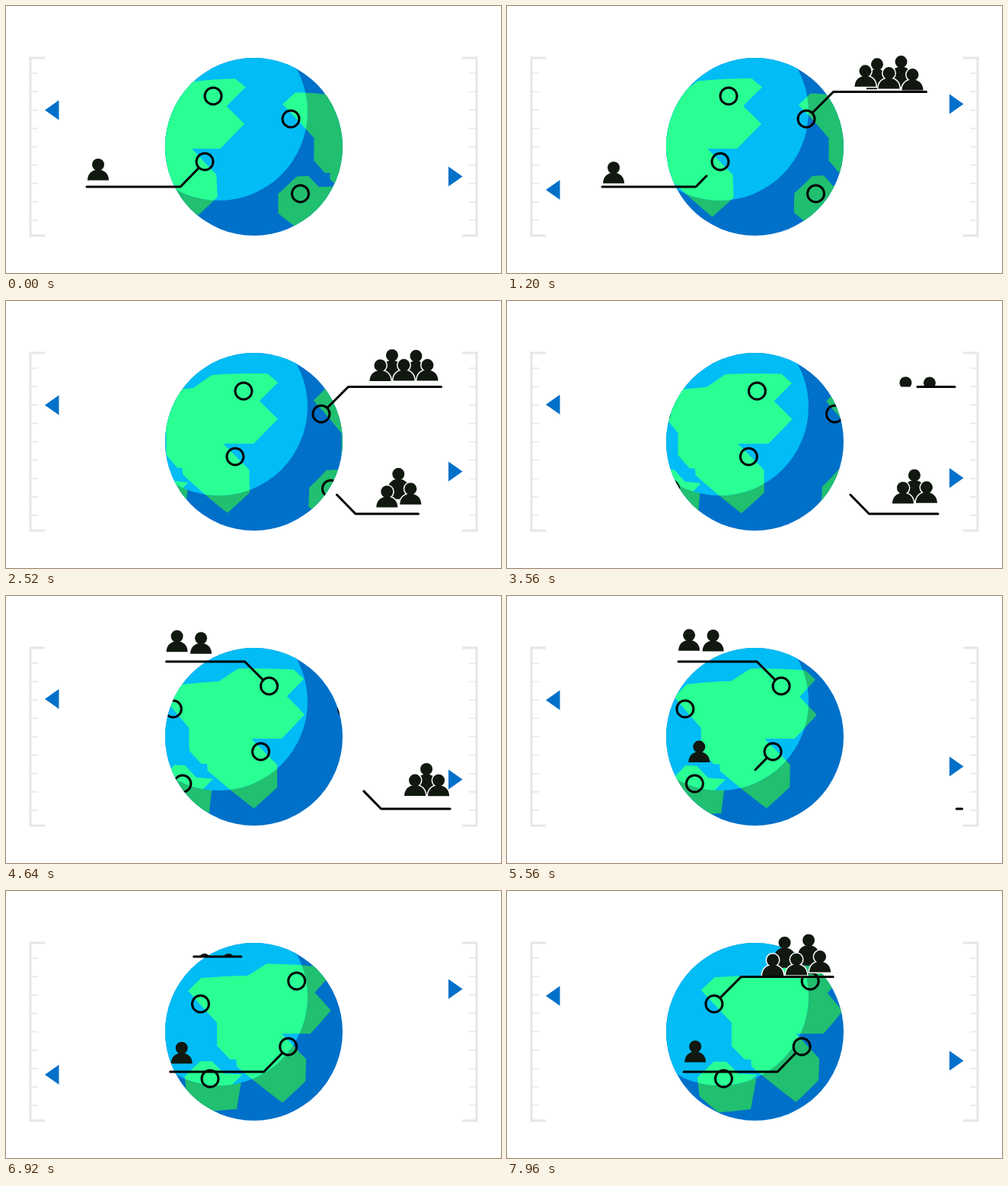
An HTML page that plays this animation: 650 by 350 pixels, repeating every 8000 ms.

```html
<!DOCTYPE html>
<html lang="en">
<head>
<meta charset="utf-8">
<title>Connected globe</title>
<style>
html, body { margin: 0; width: 100%; height: 100%; overflow: hidden; background: #fff; }
svg { display: block; width: 650px; height: 350px; }
</style>
</head>
<body>
<svg id="stage" viewBox="0 0 650 350">
  <defs>
    <clipPath id="globe"><circle cx="325.5" cy="184.5" r="116.5"/></clipPath>
    <clipPath id="lit"><circle cx="279.5" cy="138.5" r="116.5"/></clipPath>
  </defs>
  <g id="rulers" fill="none" stroke="#e6e6e6"></g>
  <g clip-path="url(#globe)">
    <rect x="208" y="67" width="235" height="235" fill="#0070c9"/>
    <path id="darkLand" fill="#21bf70"/>
    <g clip-path="url(#lit)">
      <rect x="160" y="20" width="240" height="240" fill="#02bcf5"/>
      <path id="litLand" fill="#2aff94"/>
    </g>
    <g id="pins" fill="none" stroke="#000" stroke-width="3"></g>
  </g>
  <g id="callouts"></g>
  <path id="left" fill="#0070c9" d="M51 0L69.500 -13V13Z"/>
  <path id="right" fill="#0070c9" d="M599.500 0L581 -13V13Z"/>
</svg>
<script>
const LOOP = 8000, TURN = 14400;
const PIN_SPAN = 228.2, LAND_SPAN = 252.4;
const CX = 325.5, CY = 184.5, BULGE = 172;

const $ = id => document.getElementById(id);
function add(parent, tag, attrs) {
  const el = document.createElementNS('http://www.w3.org/2000/svg', tag);
  for (const k in attrs) el.setAttribute(k, attrs[k]);
  return parent.appendChild(el);
}
const clamp = v => Math.max(0, Math.min(1, v));

// Rulers
for (const [edge, dir] of [[32, 1], [618, -1]]) {
  add($('rulers'), 'path', { d: `M${edge + 19 * dir} 68H${edge}V301H${edge + 19 * dir}`, 'stroke-width': 3 });
  for (let i = -4; i <= 4; i++) {
    add($('rulers'), 'path', { d: `M${edge} ${184.5 + i * 24.1}h${10 * dir}`, 'stroke-width': 1.5 });
  }
}

// Land outlines on the flat map, measured from the globe's centre
const mainland = [
  [-213.7, -57.2], [-195, -75], [-129.6, -76], [-103.2, -94], [-25.7, -94.3], [-11.2, -81],
  [-36.7, -54.4], [-12.5, -30], [-44.5, 2.5], [-84.8, 2.5], [-50.3, 37.2], [-49.8, 68.6],
  [-81.3, 99.4], [-144.2, 46], [-144.8, 36.7], [-153, 36.7], [-170.4, 18.8], [-170.4, -12]
];
const islandTop = [[-219.6, 63.5], [-194.3, 40], [-177.5, 40], [-161.3, 56.2], [-136.7, 57.2]];
const islandBase = [[-192, 116], [-218.7, 92.3]];
const darkIsland = [...islandTop, [-145.4, 108.6], ...islandBase];
const litIsland = [...islandTop, [-150.5, 71], [-165, 85], ...islandBase];

function project(x, y) {
  const r = Math.hypot(x, y) || 1e-6;
  const k = BULGE * Math.sin(Math.min(r / BULGE, Math.PI / 2)) / r;
  return (CX + x * k).toFixed(2) + ' ' + (CY + y * k).toFixed(2);
}
function outline(points, shift) {
  const out = [], steps = 5;
  points.forEach(([x, y], i) => {
    const [nx, ny] = points[(i + 1) % points.length];
    for (let s = 0; s < steps; s++) {
      const f = s / steps;
      out.push(project(x + (nx - x) * f + shift, y + (ny - y) * f));
    }
  });
  return 'M' + out.join('L') + 'Z';
}
function land(island, shift) {
  return [0, LAND_SPAN].map(o => outline(mainland, shift + o) + outline(island, shift + o)).join('');
}

// Pins
const PIN = { A: [272, 118], B: [261, 204], C: [374, 148], D: [386.5, 246] };
for (const [x, y] of Object.values(PIN)) {
  for (const o of [0, -PIN_SPAN]) add($('pins'), 'circle', { cx: x + o, cy: y, r: 11 });
}

// Callouts: leader line and people, relative to the pin; back row first
const KIND = {
  A: { line: [[-8, -8], [-32, -32], [-135, -32]], people: [[-121, -66, 0], [-89.5, -66, 1]] },
  B: { line: [[-8, 8.5], [-32, 33], [-155, 33]], people: [[-140, 1.5, 0]] },
  C: {
    line: [[8, -8], [35.5, -35.5], [157.5, -35.5]], rows: true,
    people: [[93, -75.5, 3, 1], [124.5, -75.5, 4, 1], [77.5, -62, 0], [108.5, -62, 1], [139.5, -62, 2]]
  },
  D: {
    line: [[8, 8], [32.5, 33], [123, 33]], rows: true,
    people: [[92, -13, 2, 1], [77, 1.5, 0], [108, 1.5, 1]]
  }
};
const NEVER = 1e5;
const callouts = [
  { kind: 'B', enter: -2400, retract: 1110, leave: 1680, drift: 2 },
  { kind: 'C', enter: 460, retract: 2865, leave: 3300, drift: 0 },
  { kind: 'D', enter: 2170, retract: 4620, leave: 4980, drift: -9.5 },
  { kind: 'A', enter: 3980, retract: 6375, leave: 6650, drift: 0 },
  { kind: 'B', enter: 5570, retract: NEVER, leave: NEVER, drift: -2 },
  { kind: 'C', enter: 7480, retract: NEVER, leave: NEVER, drift: 0, wrap: -PIN_SPAN }
];

function person(parent, back, outlined) {
  const g = add(parent, 'g', { fill: '#10180f' });
  const body = 'M-14 20.500C-14 12 -8 6.500 0 6.500S14 12 14 20.500' + (back ? 'V33H-14Z' : 'Z');
  if (outlined) {
    const halo = add(g, 'g', { stroke: '#fff', 'stroke-width': 3 });
    add(halo, 'path', { d: body });
    add(halo, 'circle', { r: 8 });
  }
  add(g, 'path', { d: body });
  add(g, 'circle', { r: 8 });
  return g;
}

callouts.forEach((c, i) => {
  const { line, people, rows } = KIND[c.kind];
  c.g = add($('callouts'), 'g', {});
  const clip = add(add(c.g, 'clipPath', { id: 'above' + i }), 'rect',
    { x: -400, y: -400, width: 800, height: 400 + line[1][1] });
  const crowd = add(c.g, 'g', { 'clip-path': `url(#above${i})` });
  c.people = people.map(([x, y, order, back]) =>
    ({ x, y, order, el: person(crowd, back, rows && !back) }));
  c.path = add(c.g, 'path', {
    d: 'M' + line.join('L'), fill: 'none', stroke: '#000', 'stroke-width': 3,
    'stroke-linecap': 'round', 'stroke-linejoin': 'round'
  });
  c.length = c.path.getTotalLength();
  c.side = Math.sign(line[2][0]);
});

// Height of a hop: fast rise to the peak, then a damped swing
function hop(t, rise) {
  if (t < 0) return -8 + 53 * (t / rise) ** 2;
  return -8 * Math.cos(Math.PI * t / 480) * Math.exp(-t * 0.0012);
}

function drawCallout(c, t, shift) {
  const visible = t > c.enter - 400 && t < Math.max(c.leave + 500, c.retract + 1000);
  c.g.style.display = visible ? '' : 'none';
  if (!visible) return;

  const [px, py] = PIN[c.kind];
  c.g.setAttribute('transform', `translate(${px + (c.wrap || 0) + shift} ${py})`);

  const grown = 1 - (1 - clamp((t - c.enter + 40) / 650)) ** 3;
  const gone = clamp((t - c.retract) / 1000);
  const from = gone * c.length, span = grown * c.length - from;
  c.path.style.display = span > 0.1 ? '' : 'none';
  c.path.setAttribute('stroke-dasharray', `${Math.max(span, 0.1)} 999`);
  c.path.setAttribute('stroke-dashoffset', -from);

  const slide = -c.side * 50 * (1 - grown);
  const drift = c.drift * clamp((t - c.enter) / 2470);
  for (const p of c.people) {
    const y = p.y + drift + hop(t - c.enter - p.order * 120, 260) + hop(c.leave - t, 290);
    p.el.setAttribute('transform', `translate(${p.x + slide} ${y})`);
  }
}

// Pointers: time, left height, right height
const STOPS = [[0, 136.5, 223.5], [1280, 242, 127.5], [2480, 136.5, 223.5], [4640, 135, 240.5], [5560, 136.5, 223.5]];
function drawPointers(t) {
  t %= 5560;
  const i = STOPS.findIndex(s => s[0] > t);
  const a = STOPS[i - 1], b = STOPS[i];
  const f = (1 - Math.cos(Math.PI * (t - a[0]) / (b[0] - a[0]))) / 2;
  $('left').setAttribute('transform', `translate(0 ${a[1] + (b[1] - a[1]) * f})`);
  $('right').setAttribute('transform', `translate(0 ${a[2] + (b[2] - a[2]) * f})`);
}

function draw(t) {
  const turn = t / TURN;
  $('darkLand').setAttribute('d', land(darkIsland, turn * LAND_SPAN));
  $('litLand').setAttribute('d', land(litIsland, turn * LAND_SPAN));
  $('pins').setAttribute('transform', `translate(${turn * PIN_SPAN} 0)`);
  for (const c of callouts) drawCallout(c, t, turn * PIN_SPAN);
  drawPointers(t);
}

const start = performance.now();
function tick() {
  draw((performance.now() - start) % LOOP);
  requestAnimationFrame(tick);
}
tick();
</script>
</body>
</html>
```
